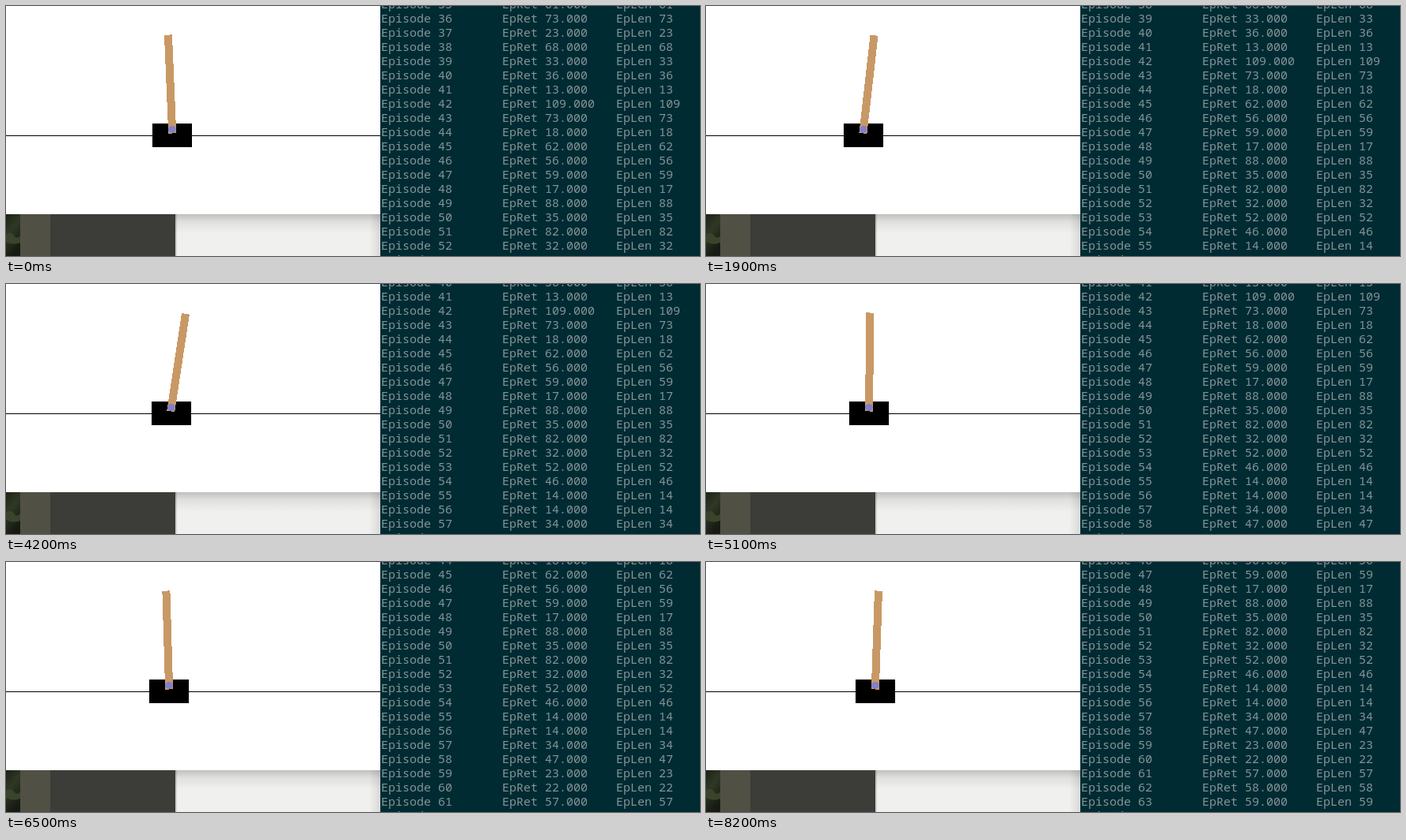
An HTML page that plays this animation: 877x317 px, repeating every 8300 ms.

```html
<!DOCTYPE html>
<html lang="en">
<head>
<meta charset="utf-8">
<title>Cart-pole training</title>
<style>
  html, body { margin: 0; width: 100%; height: 100%; overflow: hidden; background: #fff; }
  svg { display: block; }
  text { font: 15px "Noto Sans Mono", "DejaVu Sans Mono", monospace; fill: #839496; }
</style>
</head>
<body>
<svg width="877" height="317" viewBox="0 0 877 317">
  <defs>
    <linearGradient id="below" x2="0" y2="1">
      <stop offset="0" stop-opacity=".2"/>
      <stop offset=".4" stop-opacity=".07"/>
      <stop offset="1" stop-opacity="0"/>
    </linearGradient>
    <linearGradient id="beside">
      <stop offset="0" stop-opacity="0"/>
      <stop offset="1" stop-opacity=".1"/>
    </linearGradient>
    <linearGradient id="leaves" x2=".4" y2="1">
      <stop offset="0" stop-color="#1c2217"/>
      <stop offset=".45" stop-color="#2f3824"/>
      <stop offset="1" stop-color="#161a13"/>
    </linearGradient>
    <clipPath id="term"><rect x="473" width="404" height="317"/></clipPath>
  </defs>

  <rect width="877" height="317" fill="#fff"/>
  <rect y="264" width="473" height="53" fill="#f0f0ee"/>
  <rect y="264" width="214" height="53" fill="#3c3c38"/>
  <rect x="18" y="264" width="38" height="53" fill="#505045"/>
  <rect y="264" width="18" height="53" fill="url(#leaves)"/>
  <path d="M0 290q6-5 10 1t8 0v9q-9 4-18-1z" fill="#3a442b"/>
  <rect x="214" y="264" width="2" height="53" fill="#d0d0cd"/>
  <rect x="214" y="264" width="259" height="24" fill="url(#below)"/>
  <rect x="459" y="264" width="14" height="53" fill="url(#beside)"/>

  <g shape-rendering="crispEdges">
    <rect y="164" width="473" height="1" fill="#000"/>
    <g id="cart">
      <rect x="-25" y="149" width="50" height="30" fill="#000"/>
      <g transform="translate(0 156.5)">
        <rect id="pole" x="-5" y="-120" width="10" height="125" fill="#c89966"/>
        <circle r="4.7" fill="#8080cc"/>
      </g>
    </g>
  </g>

  <g clip-path="url(#term)">
    <rect x="473" width="404" height="317" fill="#002b33"/>
    <g id="log"></g>
  </g>
</svg>
<script>
const LOOP = 8300, STEP = 100, ROW = 18, FIRST = 35;
const lengths = [61, 73, 23, 68, 33, 36, 13, 109, 73, 18, 62, 56, 59, 17, 88,
  35, 82, 32, 52, 46, 14, 14, 34, 47, 23, 22, 57, 58, 59, 41];

// One run per episode: [time in steps, cart x, pole angle in radians]
const runs = [
  [[0, 210, -.042], [3, 205, -.1], [5, 202, -.19]],
  [[6, 209, -.02], [9, 203, -.08], [11, 200, -.2]],
  [[12, 206, .03], [14, 210, .09], [16, 215, .2]],
  [[17, 204, .04], [19, 199, .113], [20, 197, .17]],
  [[21, 212, .03], [25, 204, .045], [28, 198, 0], [31, 193, -.067], [33, 191, -.2]],
  [[34, 205, -.03], [38, 199, .02], [39, 197, .06], [40, 200, .09], [42, 209, .15], [43, 212, .19]],
  [[44, 206, .02], [48, 198, .08], [52, 208, -.01], [54, 212, -.12], [55, 214, -.2]],
  [[56, 210, .04], [58, 208, .108], [60, 206, .2]],
  [[61, 209, -.03], [63, 211, -.12], [64, 213, -.2]],
  [[65, 206, -.03], [67, 205, -.08], [69, 207, -.2]],
  [[70, 212, .03], [71, 212, .04], [74, 206, .06], [77, 203, .2]],
  [[78, 205, .03], [80, 204, .07], [81, 206, .075], [82, 214, .033]]
];

const $ = id => document.getElementById(id);
const cart = $("cart"), pole = $("pole"), log = $("log");

function addText(x, y, str) {
  const el = document.createElementNS("http://www.w3.org/2000/svg", "text");
  el.setAttribute("x", x);
  el.setAttribute("y", y);
  el.textContent = str;
  log.append(el);
}

lengths.forEach((n, i) => {
  const y = 3 + i * ROW;
  addText(474, y, "Episode " + (FIRST + i));
  addText(627, y, "EpRet " + n.toFixed(3));
  addText(771, y, "EpLen " + n);
});

function poseAt(run, s) {
  let i = 0;
  while (i < run.length - 2 && s >= run[i + 1][0]) i++;
  const [s0, x0, a0] = run[i], [s1, x1, a1] = run[i + 1];
  const k = Math.min(1, (s - s0) / (s1 - s0));
  return [x0 + (x1 - x0) * k, a0 + (a1 - a0) * k];
}

function draw(ms) {
  const s = Math.floor((ms % LOOP) / STEP);
  const n = runs.filter(r => r[0][0] <= s).length - 1;
  const [x, angle] = poseAt(runs[n], s);
  cart.setAttribute("transform", `translate(${Math.round(x)} 0)`);
  pole.setAttribute("transform", `rotate(${angle * 180 / Math.PI})`);
  log.setAttribute("transform", `translate(0 ${-n * ROW})`);
}

const start = performance.now();
function tick() {
  draw(performance.now() - start);
  requestAnimationFrame(tick);
}
tick();
</script>
</body>
</html>
```
